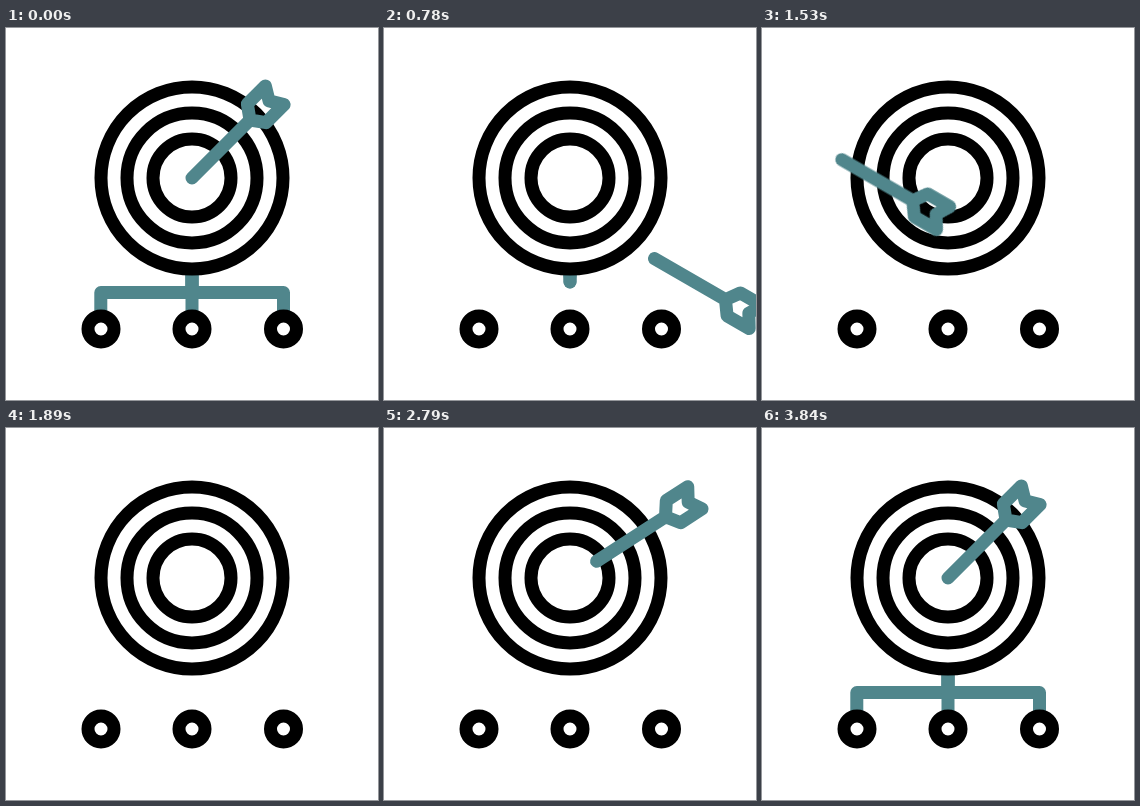
Recreate the animation shown at these times as an HTML page without scripts. Size 372 by 372 pixels, loop 4.5 s.

```html
<!DOCTYPE html>
<html lang="en">
<head>
<meta charset="utf-8">
<title>Rings and arrow</title>
<style>
  html, body { margin: 0; width: 100%; height: 100%; overflow: hidden; background: #fff; }
  svg { display: block; width: 100vw; height: 100vh; }

  :root { --smooth: cubic-bezier(.3333, 0, .6667, 1); }
  g, path { animation: 4.5s var(--smooth) infinite; }

  .ink, .accent { fill: none; stroke-width: 13; stroke-linecap: round; stroke-linejoin: round; }
  .ink { stroke: #000; }
  .accent { stroke: #50868c; }

  /* connector lines retract into the rings and grow back */
  .tree { animation-name: tree-shown; animation-timing-function: step-end; }
  .tree path { stroke-dasharray: 1 2; animation-name: retract; }
  @keyframes tree-shown {
    0% { opacity: 1; }
    20.667% { opacity: 0; }
    64.8%, 100% { opacity: 1; }
  }
  @keyframes retract {
    0% { stroke-dashoffset: 0; }
    20.667%, 64.667% { stroke-dashoffset: 1; }
    85.333%, 100% { stroke-dashoffset: 0; }
  }

  /* arrow: swing down, pull back, miss, return and hit */
  .lift { animation-name: lift; }
  .arrow { animation-name: fly, turn; }
  @keyframes lift {
    0%, 53.333% { translate: 0 0; }
    59% { translate: 0 -31px; }
    64.667%, 100% { translate: 0 0; }
  }
  @keyframes fly {
    0%, 10.667% { translate: 186px 150px; }
    23.51% { translate: 345px 301.8px; }
    42.667%, 53.3% { translate: -118px 4.8px; }
    53.333% { translate: 379px 130px; }
    64.667%, 100% { translate: 186px 150px; }
  }
  @keyframes turn {
    0% { rotate: -45deg; }
    12.667%, 42.667% { rotate: 30deg; }
    53.333% { rotate: -12deg; }
    71.333% { rotate: -56deg; }
    85.333%, 100% { rotate: -45deg; }
  }

  /* impact sparks */
  .sparks { animation-name: sparks-shown; animation-timing-function: step-end; }
  .sparks path { animation-name: spark-move, spark-length; animation-timing-function: var(--smooth), linear; }
  @keyframes sparks-shown {
    0% { opacity: 0; }
    64.8% { opacity: 1; }
    78.2%, 100% { opacity: 0; }
  }
  @keyframes spark-move {
    0%, 65.1% { stroke-dashoffset: 0; }
    78.1%, 100% { stroke-dashoffset: -1; }
  }
  @keyframes spark-length {
    0%, 64.667% { stroke-dasharray: .001 2; }
    68.556% { stroke-dasharray: .25 2; }
    72% { stroke-dasharray: .39 2; }
    73.333% { stroke-dasharray: .306 2; }
    78.1%, 100% { stroke-dasharray: .001 2; }
  }
</style>
</head>
<body>
<svg viewBox="0 0 372 372">
  <g class="accent tree">
    <path pathLength="1" d="M186 245V264.5H94.8V283.5"/>
    <path pathLength="1" d="M186 245V264.5H277.5V283.5"/>
    <path pathLength="1" d="M186 245V283.5"/>
  </g>
  <g class="ink">
    <circle cx="186" cy="150" r="91"/>
    <circle cx="186" cy="150" r="65"/>
    <circle cx="186" cy="150" r="39"/>
    <circle cx="95" cy="301" r="13"/>
    <circle cx="186" cy="301" r="13"/>
    <circle cx="277.5" cy="301" r="13"/>
  </g>
  <g class="accent sparks">
    <path pathLength="1" d="M76 92L28.5 69.3"/>
    <path pathLength="1" d="M93 85L87.7 40.5"/>
    <path pathLength="1" d="M80 114L38 127"/>
  </g>
  <g class="lift">
    <g class="accent arrow">
      <path d="M0 0H82L91.5 -13.2H117L109 0L117 13.2H91.5L82 0"/>
    </g>
  </g>
</svg>
</body>
</html>
```
